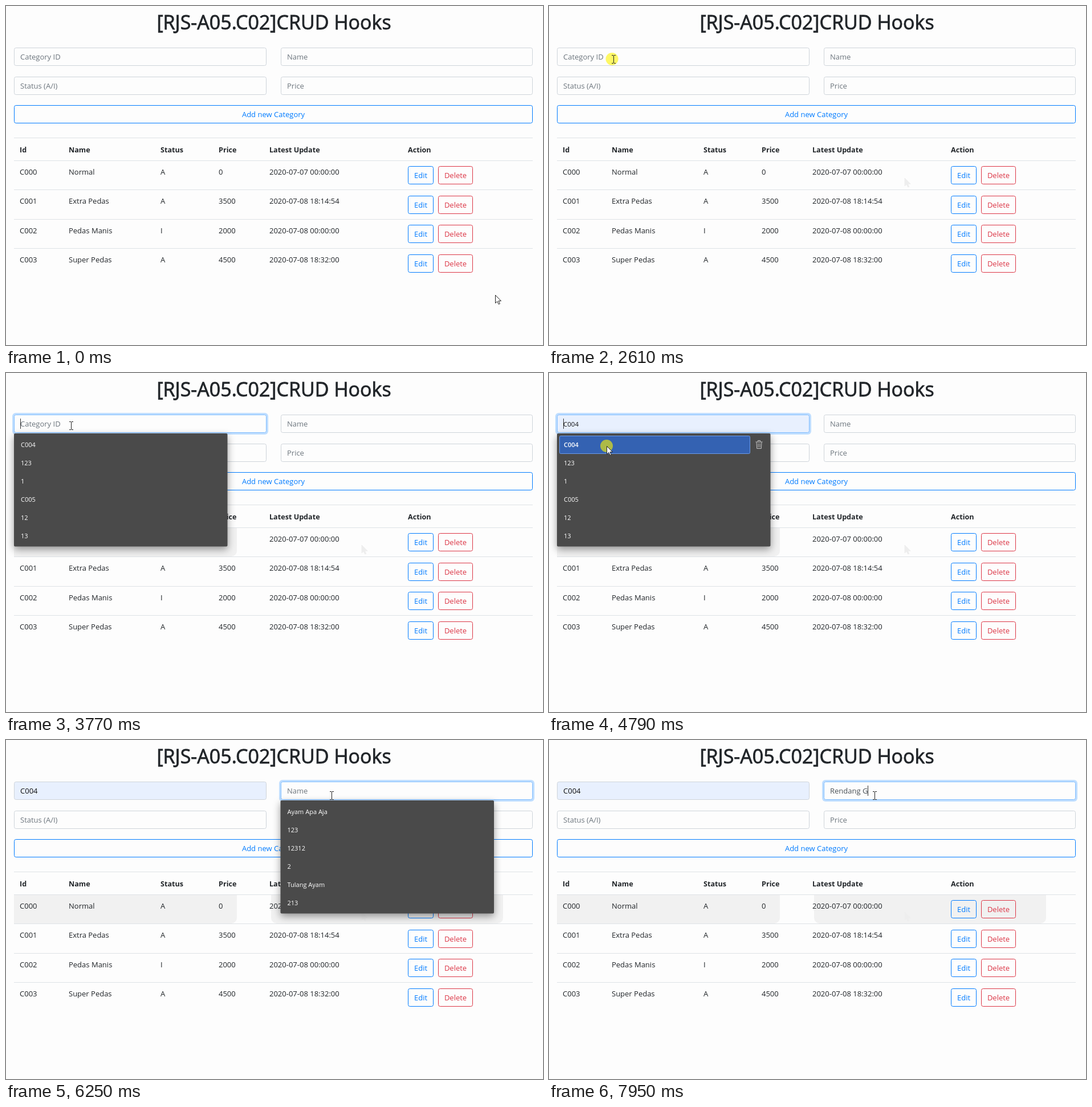
Write an HTML page with a canvas that moves like this. It is 942 by 595 pixels and loops after 8000 ms.

```html
<!DOCTYPE html>
<html lang="en">
<head>
<meta charset="utf-8">
<title>CRUD Hooks</title>
<style>
  html, body { margin: 0; height: 100%; overflow: hidden; background: #fdfdfd; }
  canvas { display: block; }
</style>
</head>
<body>
<canvas id="stage" width="942" height="595"></canvas>
<script>
const ctx = document.getElementById('stage').getContext('2d');
const LOOP = 8000;
const INK = '#212529', MUTED = '#6c757d', BLUE = '#007bff', RED = '#dc3545';
const LEFT = { x: 14, w: 443 }, RIGHT = { x: 482, w: 442 };

const rows = [
  ['C000', 'Normal', 'A', '0', '2020-07-07 00:00:00'],
  ['C001', 'Extra Pedas', 'A', '3500', '2020-07-08 18:14:54'],
  ['C002', 'Pedas Manis', 'I', '2000', '2020-07-08 00:00:00'],
  ['C003', 'Super Pedas', 'A', '4500', '2020-07-08 18:32:00']
];
const heads = ['Id', 'Name', 'Status', 'Price', 'Latest Update', 'Action'];
const columns = [24, 110, 271, 373, 462, 705];
const idHints = ['C004', '123', '1', 'C005', '12', '13'];
const nameHints = ['Ayam Apa Aja', '123', '12312', '2', 'Tulang Ayam', '213'];
const typed = 'Rendang G';
const keyTimes = [6400, 6630, 6790, 7020, 7090, 7250, 7400, 7570, 7950];

// Pointer stops: time, x, y, shape
const pointer = [
  [0, 858, 507, 'arrow'], [70, 623, 301, 'arrow'], [150, 249, 232, 'arrow'],
  [220, 9, 171, 'arrow'], [300, 0, 0, 'none'],
  [1620, 39, 57, 'arrow'], [1690, 50, 63, 'arrow'], [1770, 68, 73, 'arrow'],
  [1840, 86, 83, 'arrow'], [1910, 98, 89, 'arrow'],
  [2070, 110, 103, 'beam'], [2220, 105, 93, 'beam'], [2610, 113, 93, 'beam'],
  [3540, 114, 92, 'beam'], [4470, 101, 128, 'arrow'],
  [5000, 140, 126, 'beam'], [5090, 235, 120, 'beam'], [5170, 350, 113, 'arrow'],
  [5240, 463, 106, 'arrow'], [5320, 535, 100, 'beam'], [5390, 571.5, 97, 'beam']
];
const clicks = [[2220, 2300], [2610, 2700], [4700, 4870], [5480, 5570]];

const during = (t, a, b) => t >= a && t < b;

function text(s, x, y, color = INK, size = 13, weight = 400, align = 'left') {
  ctx.font = `${weight} ${size}px "Open Sans", "Noto Sans", sans-serif`;
  ctx.textAlign = align;
  ctx.fillStyle = color;
  ctx.fillText(s, x, y);
}

function title(s) {
  text(s, 470, 41, INK, 34, 400, 'center');
  // A hairline outline gives the medium weight
  ctx.strokeStyle = INK;
  ctx.lineWidth = .8;
  ctx.strokeText(s, 470, 41);
}

function box(x, y, w, h, r, fill, stroke) {
  ctx.beginPath();
  ctx.roundRect(x, y, w, h, r);
  if (fill) { ctx.fillStyle = fill; ctx.fill(); }
  if (stroke) { ctx.strokeStyle = stroke; ctx.lineWidth = 1; ctx.stroke(); }
}

function button(label, x, y, w, color) {
  box(x + .5, y + .5, w - 1, 31, 3, null, color);
  text(label, x + w / 2, y + 21, color, 13, 400, 'center');
}

function field({ x, w }, y, hint, { value, focus, filled, preview } = {}) {
  if (focus) box(x - 3, y - 3, w + 6, 38, 6, '#bfdeff');
  box(x + .5, y + .5, w - 1, 31, 3, filled ? '#e8f0fe' : '#fdfdfd', focus ? '#80bdff' : '#ced4da');
  if (value) text(value, x + 11, y + 21, filled ? '#111' : '#495057', preview ? 11.5 : 13);
  else text(hint, x + 11, y + 21, MUTED);
}

function caret(x) {
  ctx.fillStyle = '#333';
  ctx.fillRect(x, 80, 1, 18);
}

function line(y) {
  ctx.fillStyle = '#dee2e6';
  ctx.fillRect(14, y, 910, 1);
}

function table() {
  line(231);
  heads.forEach((s, i) => text(s, columns[i], 257, INK, 12.6, 700));
  rows.forEach((row, i) => {
    const y = 271 + 51.6 * i, top = Math.floor(y), buttonTop = Math.round(y + 10);
    line(top);
    row.forEach((s, j) => text(s, columns[j], top + 25));
    button('Edit', 705, buttonTop, 45, BLUE);
    button('Delete', 758, buttonTop, 61, RED);
  });
}

function trash(x, y) {
  ctx.strokeStyle = '#c8c8c8';
  ctx.lineWidth = 1;
  ctx.stroke(new Path2D(`M${x - 6} ${y - 4.5}h12M${x - 2} ${y - 5}v-2h4v2
    M${x - 4.5} ${y - 4}l.7 11h7.6l.7-11M${x - 1.5} ${y - 2}v7M${x + 1.5} ${y - 2}v7`));
}

function dropdown(x, items, active) {
  ctx.save();
  ctx.shadowColor = 'rgba(0,0,0,.4)';
  ctx.shadowBlur = 14;
  ctx.shadowOffsetY = 5;
  box(x, 106, 374.5, 198.5, 2, '#4a4a4a');
  ctx.restore();
  if (active) {
    box(x + 4.5, 110.5, 334, 31, 2, '#3462b2', '#6c9bea');
    trash(x + 354.5, 125.5);
  }
  items.forEach((s, i) =>
    text(s, x + 12, 130 + 31.9 * i, '#fff', 11, active && !i ? 600 : 400));
}

function tooltip(x, y, alpha) {
  ctx.globalAlpha = alpha;
  box(x + .5, y + .5, 128, 22, 1, '#3b3b3b', '#555');
  text('Please fill out this field.', x + 64.5, y + 15, '#fff', 9.5, 400, 'center');
  ctx.globalAlpha = 1;
}

function arrow(x, y, fill = '#fff', stroke = '#222') {
  const p = new Path2D('M.5 .5V14.5L3.8 11.5 6.2 16.5 8.3 15.5 6 10.7H10.5Z');
  ctx.save();
  ctx.translate(x, y);
  ctx.fillStyle = fill;
  ctx.fill(p);
  ctx.strokeStyle = stroke;
  ctx.lineWidth = 1;
  ctx.stroke(p);
  ctx.restore();
}

function beam(x, y) {
  x = Math.floor(x);
  ctx.fillStyle = '#222';
  ctx.fillRect(x, y - 6, 1, 13);
  for (const dy of [-7, 7]) {
    ctx.fillRect(x - 3, y + dy, 3, 1);
    ctx.fillRect(x + 1, y + dy, 3, 1);
  }
}

function drawPointer(t) {
  const [, x, y, shape] = pointer.findLast(p => p[0] <= t);
  if (clicks.some(c => during(t, ...c))) {
    ctx.fillStyle = 'rgba(255,245,0,.6)';
    ctx.beginPath();
    ctx.arc(shape === 'beam' ? x - 2.5 : x, y, 11, 0, 7);
    ctx.fill();
  }
  if (shape === 'arrow') arrow(x, y);
  if (shape === 'beam') beam(x, y);
}

function draw(t) {
  ctx.fillStyle = '#fdfdfd';
  ctx.fillRect(0, 0, 942, 595);

  // Faint marks left behind by the pointer and the closed lists
  if (t >= 2850) box(14, 272, 391, 50, [0, 0, 10, 0], '#f1f1f1');
  if (t >= 5570) box(465, 272, 407, 50, [0, 0, 10, 10], '#f1f1f1');
  if (t >= 150) arrow(623.5, 301.5, '#eee', '#eee');

  title('[RJS-A05.C02]CRUD Hooks');
  const count = keyTimes.filter(k => k <= t).length;
  const name = typed.slice(0, count);
  field(LEFT, 73, 'Category ID', {
    value: t >= 4560 && 'C004',
    filled: t >= 4560,
    preview: t < 4870,
    focus: during(t, 2850, 5570)
  });
  field(RIGHT, 73, 'Name', { value: name, focus: t >= 5570 });
  field(LEFT, 124, 'Status (A/I)');
  field(RIGHT, 124, 'Price');
  button('Add new Category', 14, 174, 910, BLUE);
  table();

  if (during(t, 2850, 3230) || during(t, 3770, 4320) || during(t, 4790, 4870)) caret(25);
  if (during(t, 4870, 5390)) caret(57);
  if (during(t, 5480, 5940)) caret(493);
  if (count) {
    ctx.font = '13px "Open Sans", "Noto Sans", sans-serif';
    caret(Math.round(493 + ctx.measureText(name).width));
  }

  if (during(t, 2850, 4870)) dropdown(14, idHints, t >= 4470);
  if (during(t, 5570, 6400)) dropdown(481.5, nameHints);
  if (during(t, 3230, 3540)) tooltip(120, 106, t < 3310 ? .5 : 1);
  if (during(t, 5940, 6250)) tooltip(579, 111, t < 6020 ? .5 : 1);
  drawPointer(t);
}

const start = performance.now();
function tick() {
  draw((performance.now() - start) % LOOP);
  requestAnimationFrame(tick);
}
tick();
</script>
</body>
</html>
```
